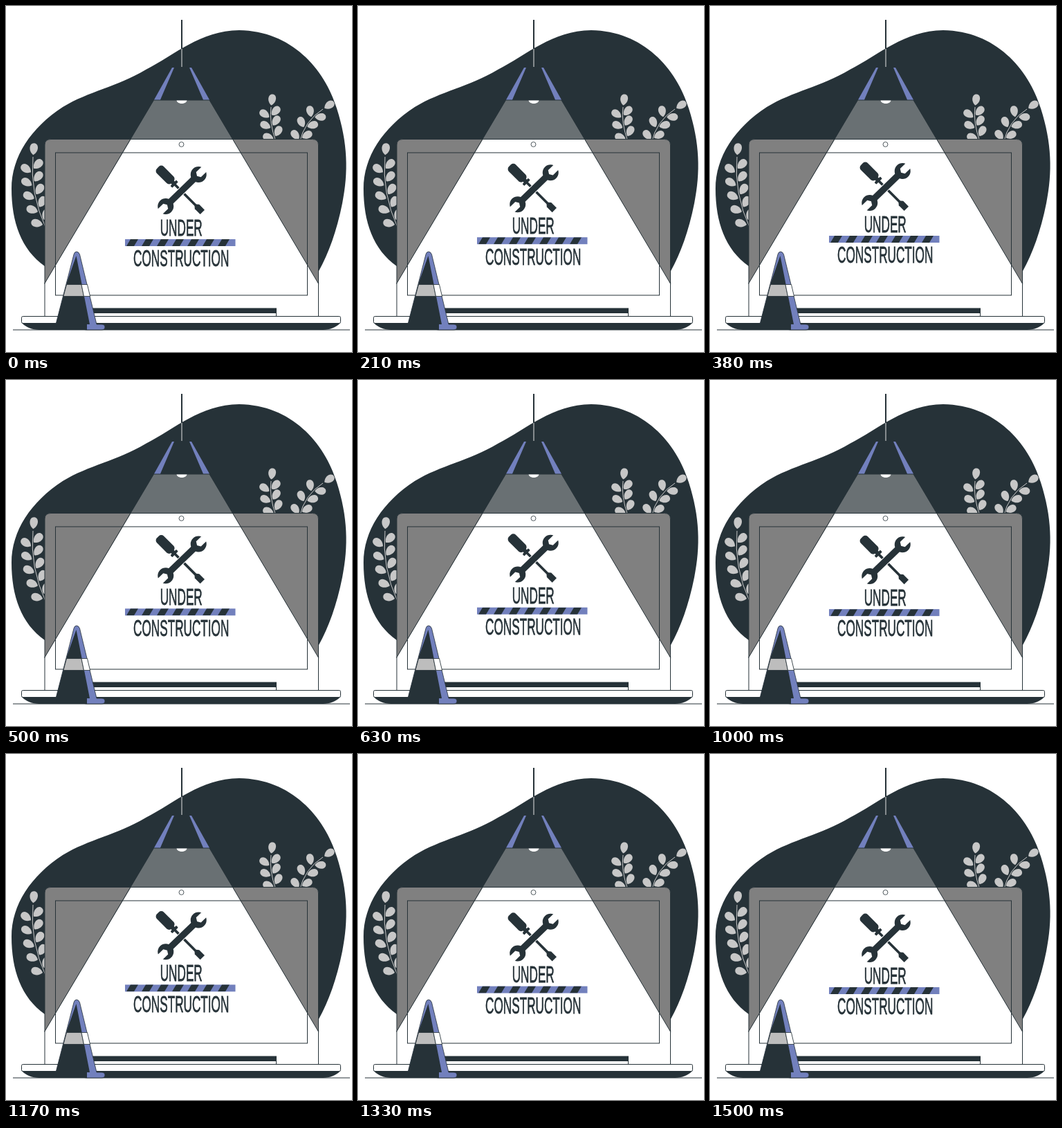
These frames come from a looping animation (500x500 px, 1540 ms). An HTML page:

```html
<!DOCTYPE html>
<html lang="en">
<head>
<meta charset="utf-8">
<title>Under construction</title>
<style>
  html, body { margin: 0; width: 100%; height: 100%; overflow: hidden; background: #fff; }
  svg { display: block; width: 100%; height: 100%; }
  .ink { fill: #263238; }
  .blue { fill: #7280bd; }
  .white { fill: #fff; }
  .line { fill: none; stroke: #263238; }
  .edge { stroke: #263238; stroke-width: .8; }
  .leaf { fill: #c7c7c7; }
  .stem { fill: none; stroke: #c7c7c7; }
  .sign { font: 32.8px "Liberation Sans", Arial, sans-serif; text-anchor: middle; stroke: #263238; stroke-width: .8; }
</style>
</head>
<body>
<svg viewBox="0 0 500 500">
  <defs>
    <path id="shell" d="M56 448V201Q56 192.500 65 192.500H442.500Q451.500 192.500 451.500 201V448"/>
    <clipPath id="lid"><use href="#shell"/></clipPath>
    <clipPath id="bar"><rect x="172" y="337" width="159.500" height="10"/></clipPath>
  </defs>

  <path class="ink" d="M56 376C22 352 8 312 8 264C8 218 36 176 82 146C120 123 160 117 202 92C245 70 280 36 337 35C412 36 460 90 478 148C494 198 495 240 486 285C478 325 466 358 452 383Z"/>
  <g id="plants"></g>

  <!-- laptop -->
  <use href="#shell" class="white"/>
  <path clip-path="url(#lid)" fill="#808080" d="M56 192H181L56 401ZM452 192H327L452 402Z"/>
  <use href="#shell" class="line"/>
  <rect class="line" x="71.500" y="212" width="364" height="206"/>
  <circle class="white edge" cx="253.500" cy="200" r="3.500"/>
  <path class="line" d="M390.500 437V448"/>
  <rect class="ink" x="118" y="436.500" width="273" height="7.500"/>
  <path class="ink" d="M23 458H483C478 464 468 468 458 468H48C38 468 28 464 23 458Z"/>
  <rect class="white line" style="fill:#fff" x="22.500" y="448.500" width="461" height="10" rx="2"/>
  <path class="line" d="M10 468H497"/>

  <!-- lamp -->
  <path fill="#697073" d="M213.500 136H294L327 192H180.500Z"/>
  <path class="line" d="M55.500 401.500L213.500 136H294L452 402"/>
  <path class="ink" d="M241 88H267L294 136H214Z"/>
  <path class="blue" d="M240 89H243L223 135.500H214ZM265 89H268L294 135.500H285Z"/>
  <path class="white" d="M246.500 136.500H261.500C260 142.500 248 142.500 246.500 136.500Z"/>
  <path class="line" stroke-width="2" d="M254 20V63"/>
  <path fill="none" stroke="#858b8e" stroke-width="2" d="M254 62V88"/>

  <!-- traffic cone -->
  <path class="blue edge" d="M98 359Q99 355 102 355T106.500 359L131 460H138Q143 460 143 464T138 468H116L72 460Z"/>
  <path class="ink" d="M101.500 361L121 460H117V468H78Q72 467 72 460L88 399Z"/>
  <path class="edge" fill="#bdbdbd" d="M87.500 402.500H109L112.500 419.500H83Z"/>
  <path class="white edge" d="M109 402.500H117.500L121.500 419.500H112.500Z"/>

  <!-- sign -->
  <g id="float">
    <g transform="translate(252 266) rotate(45)" class="ink">
      <rect x="-46" y="-7" width="30" height="14" rx="5"/>
      <rect x="-14.500" y="-6" width="4" height="12" rx="1"/>
      <rect x="-17" y="-3" width="6" height="6"/>
      <rect x="-12" y="-1.800" width="46" height="3.600"/>
      <path d="M31 -2L34 -4.500H45V4.500H34L31 2Z"/>
    </g>
    <g transform="translate(254.500 266.500) rotate(-44)">
      <rect class="white" x="-24" y="-5.700" width="48" height="11.400"/>
      <rect class="ink" x="-26" y="-4.700" width="52" height="9.400"/>
      <g id="heads"></g>
    </g>
    <rect class="blue" x="172" y="337" width="159.500" height="10"/>
    <g id="stripes" class="ink" clip-path="url(#bar)"></g>
    <g class="ink sign">
      <text transform="translate(253.200 331.500) scale(.524 1)">UNDER</text>
      <text transform="translate(253.200 376.300) scale(.524 1)">CONSTRUCTION</text>
    </g>
  </g>
</svg>
<script>
  const $ = id => document.getElementById(id);
  const repeat = (n, make) => Array.from({ length: n }, (_, i) => make(i)).join("");

  const leaf = (x, y, turn, size) =>
    `<path class="leaf" transform="translate(${x} ${y}) rotate(${turn}) scale(${size})" d="M0 -3C-9 -9 -8 -22 0 -22S9 -9 0 -3Z"/>`;

  // A curved stem from foot to tip with pairs of leaves and one at the end.
  function plant(foot, bend, tip, pairs, size) {
    const at = (t, k) => (1 - t) ** 2 * foot[k] + 2 * t * (1 - t) * bend[k] + t * t * tip[k];
    const slope = (t, k) => (1 - t) * (bend[k] - foot[k]) + t * (tip[k] - bend[k]);
    const grow = (t, spread) => leaf(at(t, 0), at(t, 1),
      Math.atan2(slope(t, 0), -slope(t, 1)) * 180 / Math.PI + spread, size);
    return `<path class="stem" d="M${foot}Q${bend} ${tip}"/>` + grow(1, 0) +
      repeat(pairs, i => grow(0.05 + 0.9 * i / pairs, -52) + grow(0.1 + 0.9 * i / pairs, 45));
  }

  $("plants").innerHTML =
    plant([58, 322], [34, 270], [39, 218], 5, 0.9) +
    plant([390, 196], [380, 168], [383, 146], 3, 0.85) +
    plant([424, 198], [431, 166], [458, 149], 3, 0.85);

  $("heads").innerHTML = repeat(2, i =>
    `<g transform="rotate(${180 * i})">
      <circle class="ink" cx="33" r="11.500"/>
      <path class="white" d="M46 -5H33L30 0L33 5H46Z"/>
    </g>`);

  $("stripes").innerHTML = repeat(7, i => `<path d="M${174 + i * 22} 347l6 -10h11l-6 10z"/>`);

  const LOOP = 1540, STEP = 1000 / 24, BOB = 1500, LEAD = 30;

  // Linear rise and fall of 10 px, advancing at 24 steps a second.
  function lift(ms) {
    const n = Math.floor((ms % LOOP + 4) / STEP);
    const p = (n * STEP + LEAD) / BOB % 1;
    return 10 * (1 - Math.abs(2 * p - 1)) - 0.4;
  }

  const start = performance.now();
  function draw(now) {
    const y = -lift(Math.max(0, now - start));
    $("float").setAttribute("transform", `translate(0 ${y.toFixed(2)})`);
    requestAnimationFrame(draw);
  }
  draw(start);
</script>
</body>
</html>
```
